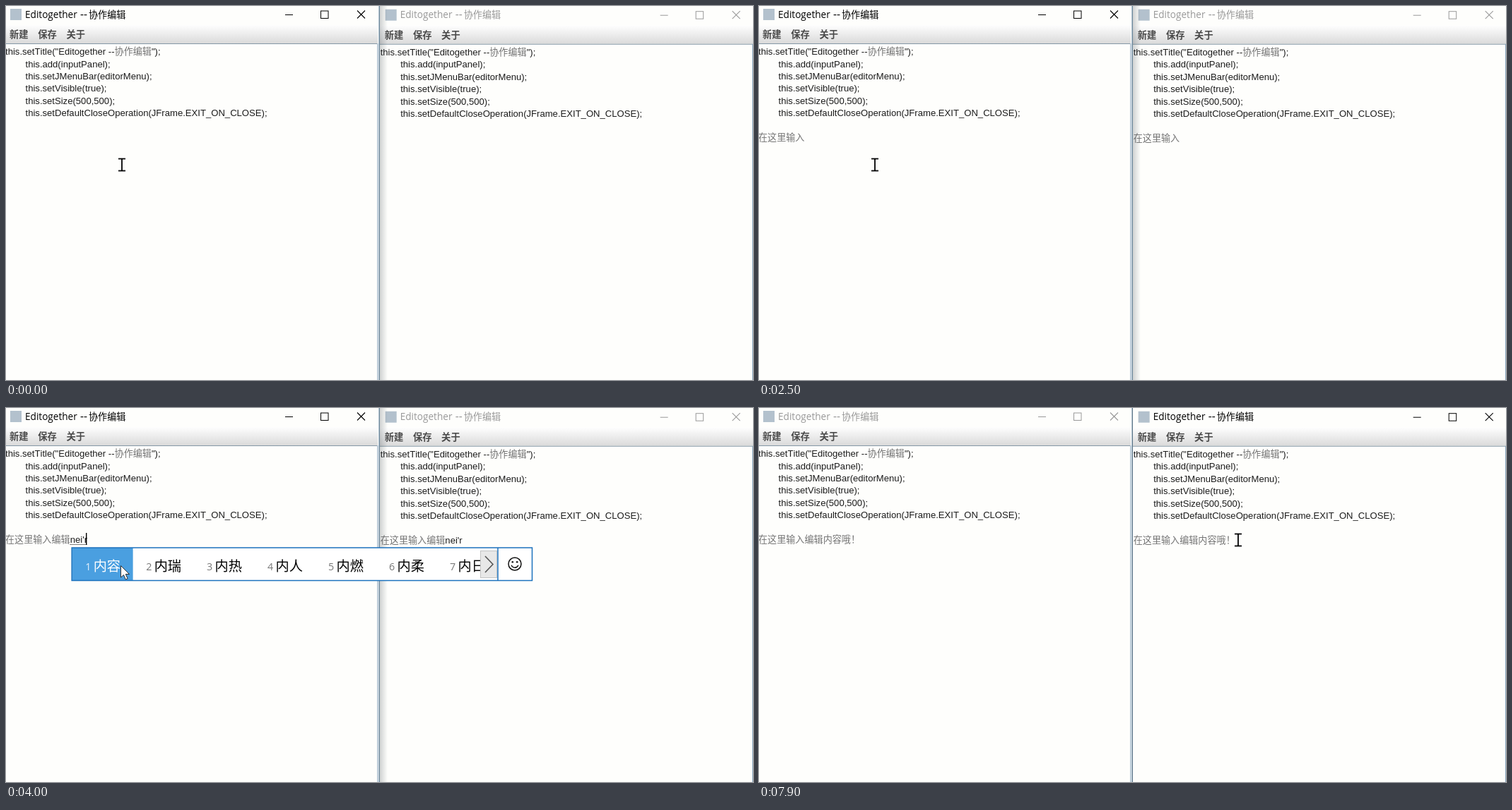
These frames come from a looping animation (1057x530 px, 8 s). An HTML page with a canvas:

```html
<!DOCTYPE html>
<html lang="zh-CN">
<head>
<meta charset="utf-8">
<style>
html, body { margin: 0; width: 100%; height: 100%; overflow: hidden; background: #fefefc; }
canvas { display: block; }
</style>
</head>
<body>
<canvas id="stage" width="1057" height="530"></canvas>
<script>
const ctx = document.getElementById('stage').getContext('2d');
const LOOP = 8000;
const UI = '"Open Sans", "Noto Sans CJK SC", sans-serif';
const BODY = '300 13.1px "Liberation Sans", "Noto Sans CJK SC", sans-serif';
const CODE = [
  'this.setTitle("Editogether --协作编辑");',
  'this.add(inputPanel);',
  'this.setJMenuBar(editorMenu);',
  'this.setVisible(true);',
  'this.setSize(500,500);',
  'this.setDefaultCloseOperation(JFrame.EXIT_ON_CLOSE);'
];

// Typing states: time, committed characters, composition, candidates, right limit of the bar
const SENTENCE = '在这里输入编辑内容哦！';
const STATES = [
  [0, 0, ''],
  [620, 0, 'z', '在 这 中 做 子 自 最'],
  [740, 0, 'za', '咋 杂 砸 扎 咱 匝 咂'],
  [860, 0, 'zai', '在 再 载 仔 宰 灾 栽'],
  [1000, 0, "zai'z", '在这 再做 在做 在 再 载 仔'],
  [1140, 0, "zai'zh", '在这 再者 在职 在中 再找 再战 在住', 597],
  [1260, 0, "zai'zhe", '在这 再者 在着 再折 在 再 载'],
  [1380, 0, "zai'zhe'l", '在这里 在这 再者 在着 在 再 载'],
  [1500, 0, "zai'zhe'li", '在这里 在这 再者 在着 在 再 载'],
  [1640, 3, ''],
  [1740, 3, 's', '是 说 上 三 时 所 四'],
  [1850, 3, 'sh', '是 说 上 时 十 谁 使'],
  [2000, 3, 'shu', '数 书 属 树 输 熟 术'],
  [2150, 3, "shu'r", '输入 数人 熟人 书 数 属 树'],
  [2300, 3, "shu'ru", '输入 竖入 数 书 属 树 输'],
  [2450, 5, ''],
  [2600, 5, 'b', '不 把 被 吧 比 本 别'],
  [2750, 5, 'bi', '比 必 笔 逼 毕 闭 币'],
  [2900, 5, 'bia', '比啊 边 变 编 彼岸 便 遍'],
  [3040, 5, 'bian', '便 边 变 编 Nulvra 彼岸 遍'],
  [3180, 5, "bian'j", '编辑 边界 便捷 边境 变 编 便'],
  [3300, 5, "bian'ji", '编辑 边际 编剧 编 便 边 变'],
  [3440, 7, ''],
  [3560, 7, 'n', '你 那 能 呢 年 女 内'],
  [3690, 7, 'ne', '呢 哪 讷 那 呐 能 嫩'],
  [3820, 7, 'nei', '内 那 哪 馁 呢 能 嫩'],
  [3950, 7, "nei'r", '内容 内瑞 内热 内人 内燃 内柔 内日'],
  [4080, 7, "nei'ro", '内容 内柔 内肉 内 那 哪 馁'],
  [4200, 7, "nei'ron", '内容 内融 内 那 哪 馁 呢'],
  [4320, 7, "nei'rong", '内容 内融 内 那 哪 馁 呢'],
  [4450, 9, ''],
  [4600, 9, 'o', '哦 噢 喔 欧 偶 呕 鸥'],
  [4760, 10, ''],
  [5000, 11, '']
];

function text(s, x, y, font, color) {
  ctx.font = font;
  ctx.fillStyle = color;
  ctx.fillText(s, x, y);
}
function rect(x, y, w, h, color) {
  ctx.fillStyle = color;
  ctx.fillRect(x, y, w, h);
}
function line(color, width, ...points) {
  ctx.strokeStyle = color;
  ctx.lineWidth = width;
  ctx.beginPath();
  points.forEach(([x, y]) => ctx.lineTo(x, y));
  ctx.stroke();
}
function widthOf(s, font) {
  ctx.font = font;
  return ctx.measureText(s).width;
}
function fade(x0, y0, x1, y1, from, to) {
  const g = ctx.createLinearGradient(x0, y0, x1, y1);
  g.addColorStop(0, from);
  g.addColorStop(1, to);
  return g;
}

// Chinese runs are set paler, like the thin strokes of a Song face
function bodyText(s, x, y) {
  for (const run of s.match(/[\x00-\x7f]+|[^\x00-\x7f]+/g) || []) {
    text(run, x, y, BODY, run < '\x7f' ? '#1c1c1c' : '#757575');
    x += widthOf(run, BODY);
  }
}

function drawWindow(x, y, width, active, typed) {
  const ink = active ? '#000' : '#999';
  ctx.save();
  ctx.beginPath();
  ctx.rect(Math.max(0, x - 2), 0, width, 530);
  ctx.clip();
  ctx.translate(x, y);
  rect(-3, -1, 540, 540, '#fefefc');

  rect(6, 4, 16, 16, '#b3c1cd');
  text('Editogether', 27, 16.6, '13.6px ' + UI, ink);
  text('--', 105, 16.6, '15.5px ' + UI, ink);
  text('协作编辑', 117, 16.6, '13.1px "Noto Sans CJK SC", sans-serif', ink);
  line(ink, 1, [395, 12.5], [406, 12.5]);
  ctx.strokeRect(445.5, 7, 10.5, 10.5);
  line(ink, 1.1, [497, 6.5], [508, 17.5]);
  line(ink, 1.1, [508, 6.5], [497, 17.5]);

  rect(-3, 27, 540, 26, fade(0, 27, 0, 53, '#fefefe', '#dadada'));
  rect(-3, 53, 540, 1, '#8497a6');
  ['新建', '保存', '关于'].forEach((s, i) =>
    text(s, 5 + i * 40.2, 45.3, 'bold 13.3px "Noto Sans CJK SC", sans-serif', '#4a4a4a'));

  CODE.forEach((s, i) => bodyText(s, i ? 27.5 : -1, 69.2 + i * 17.4));
  bodyText(typed, -1, 191.2);
  ctx.restore();
}

function drawSmiley(x, y) {
  ctx.strokeStyle = ctx.fillStyle = '#111';
  ctx.lineWidth = 1.5;
  ctx.beginPath();
  ctx.arc(x, y, 9, 0, 7);
  ctx.stroke();
  ctx.beginPath();
  ctx.arc(x, y, 5.2, 0.35, Math.PI - 0.35);
  ctx.stroke();
  for (const dx of [-3.2, 3.2]) {
    ctx.beginPath();
    ctx.arc(x + dx, y - 2.8, 1.3, 0, 7);
    ctx.fill();
  }
}

function drawBar(left, list, mouseX, hovering, limit = 1057) {
  const font = '19.2px ' + UI;
  const cells = list.split(' ').map(s => ({ s, w: widthOf(s, font) + 47.6 }));
  const split = left + 1 + cells.reduce((sum, c) => sum + c.w, 0);
  const right = split + 48.5;
  ctx.save();
  ctx.beginPath();
  ctx.rect(0, 190, limit, 60);
  ctx.clip();
  rect(left, 198, right - left, 47, '#fff');
  let x = left + 0.5;
  cells.forEach(({ s, w }, i) => {
    const over = hovering && mouseX >= x && mouseX < x + w;
    if (i === 0) rect(x, 198, w, 47, over ? '#4a9fe0' : '#0c7ad3');
    else if (over) rect(x, 198, w, 47, '#abd7f9');
    text(i + 1, x + 18.5, 230, '14.3px ' + UI, i === 0 ? '#e8f3fc' : over ? '#111' : '#777');
    text(s, x + 30, 230.5, font, i === 0 ? '#fff' : '#000');
    x += w;
  });
  if (hovering) {
    rect(split - 25, 202, 24, 39, '#c4c4c4');
    rect(split - 24, 203, 22, 37, '#e8e8e8');
    line('#555', 1.6, [split - 18, 210], [split - 7, 221.5], [split - 18, 233]);
  }
  line('#1c72bd', 1.5, [split, 198], [split, 245]);
  ctx.strokeRect(left, 198, right - left, 46.5);
  drawSmiley(split + 24, 221);
  ctx.restore();
}

function drawBeam(x, y) {
  for (const [color, width] of [['#fff', 4], ['#000', 1.8]]) {
    line(color, width, [x, y - 8], [x, y + 8]);
    line(color, width, [x - 5, y - 8.5], [x + 5, y - 8.5]);
    line(color, width, [x - 5, y + 8.5], [x + 5, y + 8.5]);
  }
}
function drawArrow(x, y) {
  ctx.beginPath();
  [[0, 0], [0, 16.5], [4, 13], [6.8, 19.5], [9.6, 18.3], [6.8, 12], [12, 12]]
    .forEach(([dx, dy]) => ctx.lineTo(x + dx, y + dy));
  ctx.closePath();
  ctx.fillStyle = '#fff';
  ctx.fill();
  ctx.strokeStyle = '#333';
  ctx.lineWidth = 1;
  ctx.stroke();
}

function drawSeam(leftActive) {
  rect(525, 53, 1, 477, '#b4c6d5');
  rect(526, 53, 1, 477, '#d3dde5');
  rect(527, 0, 1, 530, '#b3c4d1');
  rect(528, 0, 1, 530, leftActive ? '#708a9c' : '#5f7788');
  if (leftActive) rect(529, 0, 11, 530, fade(529, 0, 540, 0, 'rgba(60,70,75,.24)', 'rgba(60,70,75,0)'));
  rect(1056, 54, 1, 476, '#88a5bd');
}

function draw(t) {
  const [, count, composing, list, limit] = STATES.filter(s => s[0] <= t).pop();
  const done = SENTENCE.slice(0, count);
  const leftActive = t < 7500;
  ctx.fontKerning = 'none';

  drawWindow(0, 0, 526, leftActive, done + composing);
  drawWindow(530.7, 0.7, 530, !leftActive, done + composing);
  drawSeam(leftActive);

  const start = -1 + widthOf(done, BODY);
  const end = start + widthOf(composing, BODY);
  if (composing) {
    ctx.setLineDash([1, 1]);
    line('#000', 1, [Math.max(0, start), 193.5], [end, 193.5]);
    ctx.setLineDash([]);
    rect(Math.round(end) - 2, 177, 1.4, 17, '#000');
  } else if (count && leftActive && Math.floor(t / 500) % 2 === 0) {
    rect(Math.round(end), 177, 1, 17, '#333');
  }

  const k = Math.min(1, Math.max(0, (t - 6700) / 700));
  const ease = k * k * (3 - 2 * k);
  const mouseX = 164 + 514 * ease;
  const mouseY = 225 - 38 * ease;
  if (list) {
    drawBar(start + 2.5, list, mouseX, t > 2000, limit);
    drawArrow(mouseX - 1.5, mouseY - 1.5);
  } else {
    drawBeam(mouseX, mouseY);
  }
}

function tick() {
  draw(performance.now() % LOOP);
  requestAnimationFrame(tick);
}
tick();
</script>
</body>
</html>
```
